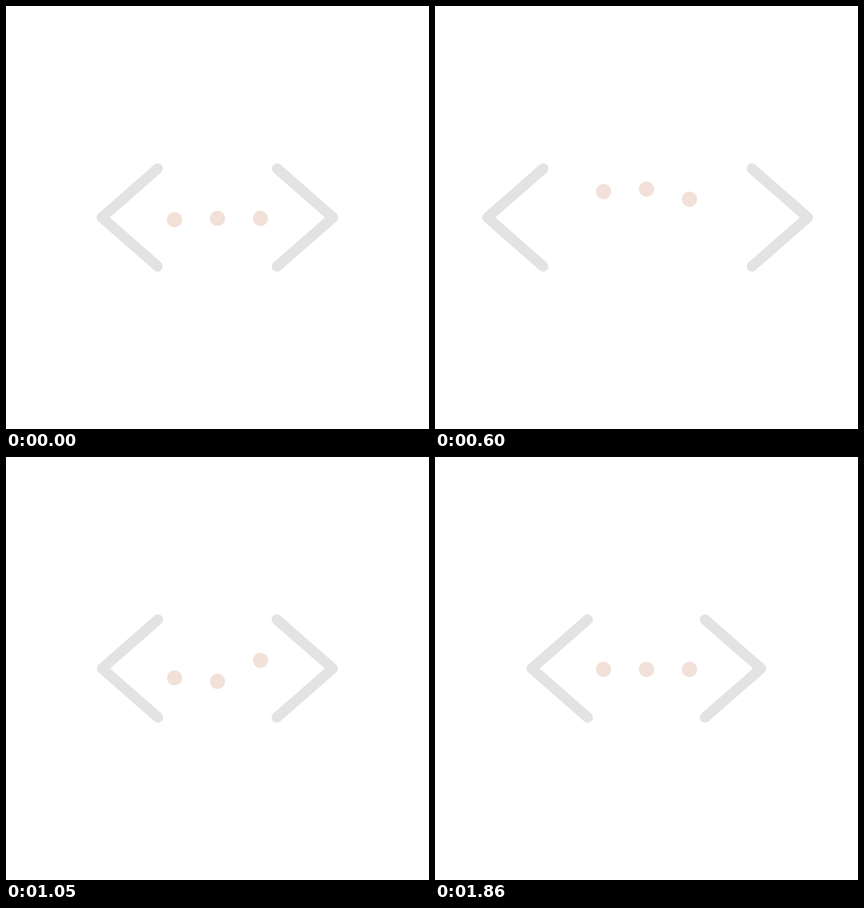
An HTML page that plays this animation: 748 by 748 pixels, repeating every 3.89 s.

```html
<!DOCTYPE html>
<html lang="en">
<head>
<meta charset="utf-8">
<title>Brackets and dots</title>
<style>
  html, body { margin: 0; width: 100%; height: 100%; overflow: hidden; background: #fff; }
  svg { display: block; width: 100%; height: 100%; }
  path { fill: none; stroke: #e3e3e3; stroke-width: 18.5; stroke-linecap: round; stroke-linejoin: round; }
  circle { fill: #f2e1d9; }
</style>
</head>
<body>
<svg viewBox="0 0 748 748">
  <path id="left" d="M269.9 287.5 171.2 374 269.9 460.5"/>
  <path id="right" d="M477.5 287.5 576.4 374 477.5 460.5"/>
  <circle class="dot" cx="298" cy="375.5" r="13.4"/>
  <circle class="dot" cx="374" cy="375.5" r="13.4"/>
  <circle class="dot" cx="450" cy="375.5" r="13.4"/>
</svg>
<script>
const LOOP = 3890, STEP = 30, DOT_DELAY = 5, RIGHT_SCALE = 1.055;

// Each swing eases to its turning point; skew below 1 hurries the start, above 1 holds it back.
const spread = swing([
  { at: 15, to: 79.8, skew: 0.88 },
  { at: 39, to: -15.5, skew: 1.7 },
  { at: 52, to: 0 },
]);
const bounce = swing([
  { at: 3.7, to: 20 },
  { at: 16, to: -52.3, skew: 0.6 },
  { at: 31, to: 23, skew: 1.4 },
  { at: 43, to: -7.6 },
  { at: 52, to: 0 },
]);

function ease(p, skew) {
  const q = p ** skew;
  return q * q * (3 - 2 * q);
}

function swing(turns) {
  return step => {
    let from = 0, begin = -1;
    if (step <= begin) return from;
    for (const { at, to, skew = 1 } of turns) {
      if (step < at) return from + (to - from) * ease((step - begin) / (at - begin), skew);
      from = to;
      begin = at;
    }
    return from;
  };
}

const left = document.getElementById("left");
const right = document.getElementById("right");
const dots = document.querySelectorAll(".dot");
const move = (el, x, y) => el.setAttribute("transform", `translate(${x.toFixed(2)} ${y.toFixed(2)})`);

function draw(time) {
  const step = Math.floor(time % LOOP / STEP);
  const offset = spread(step);
  move(left, -offset, 0);
  move(right, offset * RIGHT_SCALE, 0);
  dots.forEach((dot, i) => move(dot, 0, bounce(step - i * DOT_DELAY)));
}

const start = performance.now();
function tick() {
  draw(performance.now() - start);
  requestAnimationFrame(tick);
}
tick();
</script>
</body>
</html>
```
